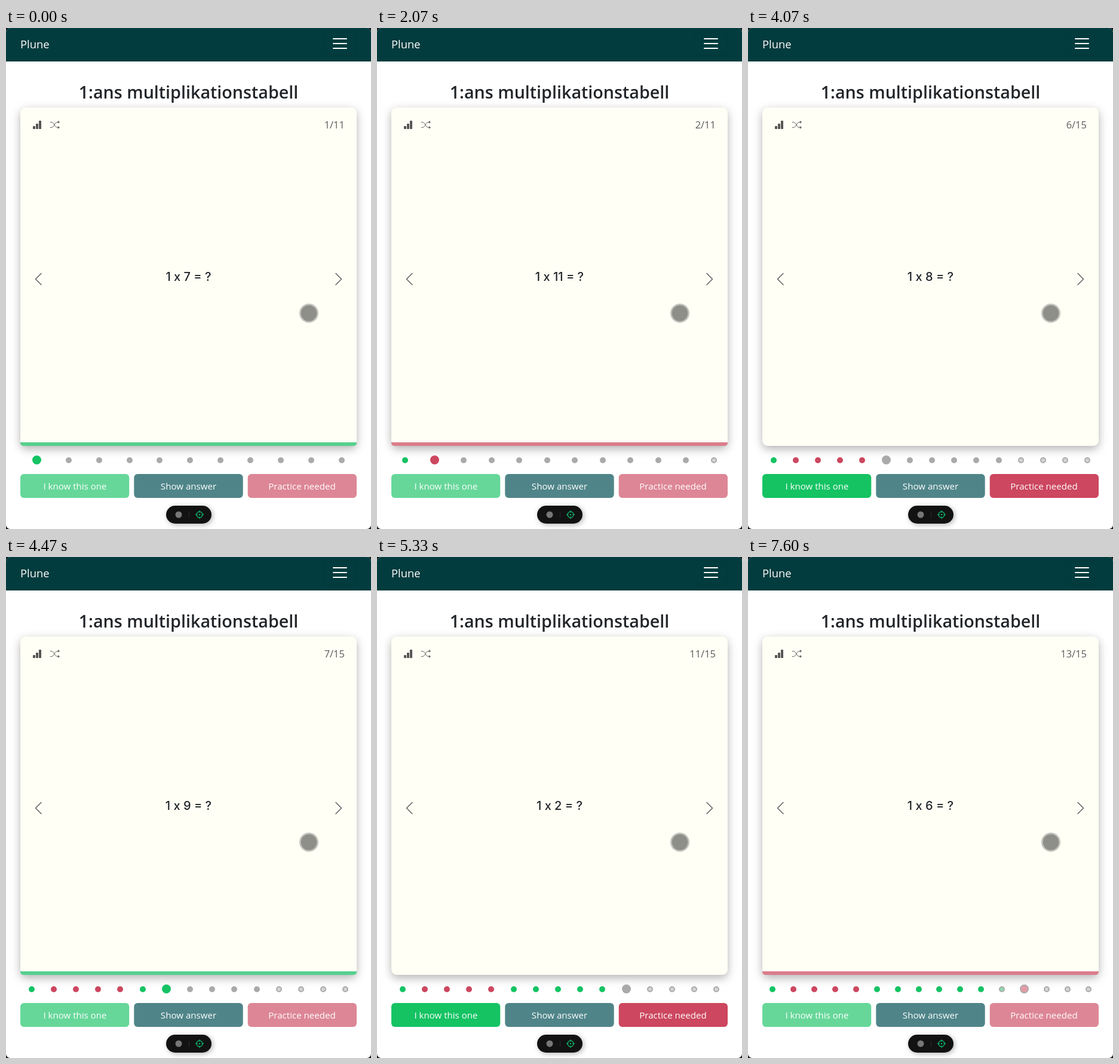
An HTML page that plays this animation: 611x838 px, repeating every 8000 ms.

```html
<!DOCTYPE html>
<html lang="sv">
<head>
<meta charset="utf-8">
<title>Flashcards</title>
<style>
  html, body { margin: 0; width: 100%; height: 100%; overflow: hidden; background: #111; }
  svg { display: block; width: 611px; height: 838px; font-family: "Open Sans", "Noto Sans", sans-serif; }
  .card { fill: #fffff5; filter: drop-shadow(0 5px 7.5px rgba(0, 0, 0, .3)); }
  .title { font-size: 28.7px; font-weight: 600; fill: #212529; }
  .brand { font-size: 18.4px; fill: #fff; }
  .counter { font-size: 16.5px; fill: #5c5c5c; }
  .question { font: 500 20px Inter, "Noto Sans", sans-serif; font-variant-numeric: slashed-zero; fill: #212529; }
  .label { font-size: 15.1px; fill: #fff; }
  .icon { fill: none; stroke: #555; stroke-width: 1.3; stroke-linecap: round; stroke-linejoin: round; }
  .mid { text-anchor: middle; }
  .end { text-anchor: end; }
  .done .choice { opacity: .65; }
  #bar { display: none; }
  .done #bar { display: block; }
  .pill { fill: #121212; filter: drop-shadow(2px 2px 4px rgba(0, 0, 0, .3)); }
</style>
</head>
<body>
<svg id="stage" viewBox="0 0 611 838">
  <rect width="611" height="838" rx="7" fill="#fff"/>
  <path d="M0 56V7a7 7 0 0 1 7-7H604a7 7 0 0 1 7 7V56z" fill="#033c3e"/>
  <text class="brand" x="24" y="34">Plune</text>
  <rect x="531.5" y="6.5" width="55" height="39" rx="6" fill="none" stroke="#033739"/>
  <path d="M548 18h22M548 26h22M548 34h22" stroke="#fff" stroke-width="2" stroke-linecap="round"/>

  <text class="title mid" x="305.5" y="118">1:ans multiplikationstabell</text>
  <rect class="card" x="24" y="133" width="563" height="566" rx="9"/>
  <path id="bar" d="M24 693H587v1a5 5 0 0 1-5 5H29a5 5 0 0 1-5-5z"/>

  <g fill="#555">
    <rect x="45" y="164" width="4" height="5" rx=".8"/>
    <rect x="50" y="160" width="4" height="9" rx=".8"/>
    <rect x="55" y="155" width="4" height="14" rx=".8"/>
  </g>
  <g class="icon">
    <g transform="translate(74 154)" stroke-width="1">
      <path d="M.5 3.5H1C5 3.5 6.500 7 7 8S9 12.500 13 12.500M.5 12.500H1C5 12.500 6.500 9 7 8S9 3.500 13 3.500"/>
      <path d="M13.300 1.800v3.400l2.200-1.700zM13.300 10.800v3.400l2.200-1.700z" fill="#555" stroke-width=".6"/>
    </g>
    <path d="M59 410.500l-9.500 9.500 9.500 9.500M552 410.500l9.500 9.500-9.500 9.500"/>
  </g>
  <text id="counter" class="counter end" x="567" y="168"></text>
  <text id="question" class="question mid" x="305.5" y="423"></text>

  <circle cx="507" cy="477" r="16" fill="#c3c3bd"/>
  <circle cx="507" cy="477" r="13.300" fill="#8f8f89"/>

  <g id="dots"></g>

  <g class="choice">
    <rect x="24" y="746" width="182.300" height="40" rx="6" fill="#15c363"/>
    <text class="label mid" x="115.500" y="772">I know this one</text>
  </g>
  <rect x="214.300" y="746" width="182.400" height="40" rx="6" fill="#4f8589"/>
  <text class="label mid" x="305.500" y="772">Show answer</text>
  <g class="choice">
    <rect x="404.700" y="746" width="182.300" height="40" rx="6" fill="#cc475f"/>
    <text class="label mid" x="495.500" y="772">Practice needed</text>
  </g>

  <rect class="pill" x="268" y="799" width="76" height="30" rx="15"/>
  <circle cx="289" cy="814" r="5.500" fill="#777"/>
  <path d="M306.500 809v10" stroke="#2c2c2c"/>
  <g fill="none" stroke="#0fae68" stroke-width="1.300">
    <circle cx="324" cy="814" r="5"/>
    <path d="M324 807v3.500M324 817.500v3.500M317 814h3.500M327.500 814h3.500"/>
    <circle cx="324" cy="814" r=".7" fill="#0fae68"/>
  </g>
</svg>
<script>
  const LOOP = 8000, DECK = 11;
  // Steps alternate: next card shown, card answered.
  const steps = [870, 2070, 2730, 2930, 3130, 3270, 3470, 3600, 4070, 4200, 4330, 4470,
    4600, 4730, 4870, 5000, 5130, 5270, 5330, 5530, 5730, 6400, 7000, 7600];
  const factors = [7, 11, 6, 10, 4, 8, 9, 3, 5, 1, 2, 11, 6];
  const marks = "grrrrgggggggr";
  const dotColor = { g: "#15c363", r: "#cc475f" };
  const ringColor = { g: "#8edbb0", r: "#e39ba7" };
  const barColor = { g: "#57d08d", r: "#db7d8b" };
  const $ = id => document.getElementById(id);

  // Every card that needs practice is queued again at the end.
  const totalAfter = n => DECK + marks.slice(0, n).split("r").length - 1;

  // Dots are spaced evenly and snapped to whole pixels.
  function drawDots(card, answered) {
    const total = totalAfter(answered);
    const gap = (563 - 10 * total - 5) / total;
    let x = 24 + gap / 2, out = "";
    for (let i = 0; i < total; i++) {
      const size = i === card - 1 ? 15 : 10;
      const mark = marks.slice(0, answered)[i];
      const r = size / 2, cx = Math.round(x) + r, cy = Math.round(722.5 - r) + r;
      out += i < DECK
        ? `<circle cx="${cx}" cy="${cy}" r="${r}" fill="${dotColor[mark] || "#aaa"}"/>`
        : `<circle cx="${cx}" cy="${cy}" r="${r - 1}" fill="${ringColor[mark] || "#d4d4d4"}" stroke="#aaa" stroke-width="2"/>`;
      x += size + gap;
    }
    $("dots").innerHTML = out;
  }

  function show(step) {
    const card = 1 + Math.ceil(step / 2);
    const done = step % 2 === 0;
    $("counter").textContent = `${card}/${totalAfter(card - 1)}`;
    $("question").textContent = `1 x ${factors[card - 1]} = ?`;
    $("bar").setAttribute("fill", barColor[marks[card - 1]]);
    $("stage").classList.toggle("done", done);
    drawDots(card, done ? card : card - 1);
  }

  let shown = -1;
  const start = performance.now();
  function tick() {
    const t = (performance.now() - start) % LOOP;
    const step = steps.filter(s => s <= t).length;
    if (step !== shown) show(shown = step);
    requestAnimationFrame(tick);
  }
  tick();
</script>
</body>
</html>
```
